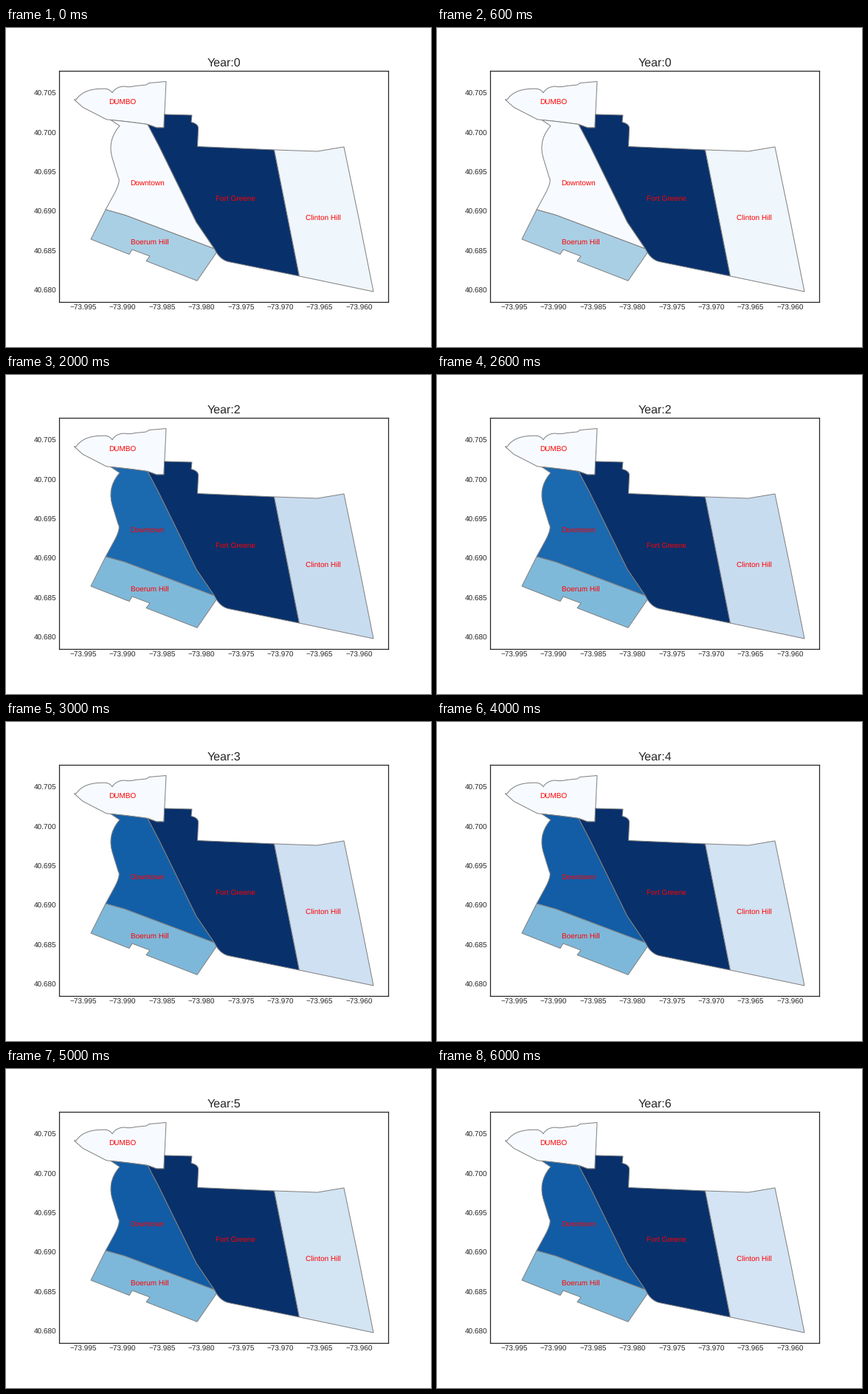
These frames come from a looping animation (576x432 px, 7000 ms). A matplotlib script:

```python
import numpy as np
import matplotlib.pyplot as plt
from matplotlib.animation import FuncAnimation
from matplotlib.patches import Polygon

plt.rcParams["font.family"] = "Liberation Sans"
plt.rcParams["text.hinting"] = "none"

W, H = 576, 432
LEFT, RIGHT, TOP, BOTTOM = 72, 518.4, 58.3, 371.3
STEP = 53.4  # pixels per 0.005 degrees
YEARS = 7
INK = "0.15"


def curve(a, bend, b):
    """Points of a quadratic curve from a to b, pulled towards bend."""
    t = np.linspace(0, 1, 9)[:, None]
    a, bend, b = map(np.array, (a, bend, b))
    return [*((1 - t) ** 2 * a + 2 * t * (1 - t) * bend + t ** 2 * b)]


# Borders shared by neighbours, in stage pixels (y grows downwards).
corner = (282.5, 299)
north = curve((142, 124.5), (168, 127), (192, 130.5))
quay = [(192, 130.5), (204, 135), (214, 135)]
middle = [(192, 130.5), (207, 159), (258, 263), corner]
south = [(135, 246), (161, 253.3), corner]
east = [(363.5, 165), (397.5, 336)]

dumbo = [
    *north, *quay, (217, 72.5), (194, 74.5), (190, 77),
    *curve((175, 78.5), (167, 80.5), (160, 79)),
    *curve((160, 79), (149, 79.5), (144, 87.8)),
    *curve((144, 87.8), (140, 81.5), (131, 82.3)),
    *curve((131, 82.3), (105, 82), (95, 97)),
    (92.3, 96.8), (104, 107.3), (136, 123.8)]

downtown = [
    *north, *middle, *south[::-1],
    *curve((147, 224), (156, 207), (152, 202)),
    *curve((144, 176), (137, 152), (154, 132.5))]

boerum = [
    *south, (286, 303), (259, 342.3), (190, 315.5), (195, 309),
    (171, 300), (167, 306.5), (115, 286)]

greene = [
    *quay, (214.5, 117), (252, 118),
    *curve((251, 127.5), (262, 130), (260.5, 138)), (259.5, 160.5),
    *east, *curve((304, 317), (290, 315), corner), *middle[::-1]]

clinton = [*east[::-1], (422, 167), (458, 161), (479, 262), (498, 357)]

# name, outline, label centre and baseline, share of the scale by year
AREAS = [
    ("DUMBO", dumbo, (158, 104.3), lambda y: 0.0),
    ("Downtown", downtown, (192, 212.7), lambda y: 0.83 * (1 - 0.25 ** y)),
    ("Boerum Hill", boerum, (195, 292.7),
     lambda y: 0.456 - 0.116 * 0.22 ** y),
    ("Fort Greene", greene, (311, 234.5), lambda y: 1.0),
    ("Clinton Hill", clinton, (430, 259.5),
     lambda y: 0.17 + 0.229 * 0.55 ** y - 0.359 * 0.05 ** y),
]

fig = plt.figure(figsize=(W / 72, H / 72), dpi=72, facecolor="white")
ax = fig.add_axes([LEFT / W, 1 - BOTTOM / H,
                   (RIGHT - LEFT) / W, (BOTTOM - TOP) / H])
ax.set_xlim(LEFT, RIGHT)
ax.set_ylim(BOTTOM, TOP)
ax.set_xticks([104.8 + STEP * i for i in range(8)],
              [f"\u2212{73.995 - 0.005 * i:.3f}" for i in range(8)])
ax.set_yticks([88.4 + STEP * i for i in range(6)],
              [f"{40.705 - 0.005 * i:.3f}" for i in range(6)])
ax.tick_params(length=0, pad=3.5, labelsize=10, labelcolor=INK)
for spine in ax.spines.values():
    spine.set(color=INK, linewidth=1.25)

title = ax.set_title("", fontsize=16, color=INK, pad=6)
blues = plt.get_cmap("Blues")
patches = []
for name, outline, spot, _ in AREAS:
    patch = Polygon(outline, closed=True, edgecolor="gray", linewidth=1)
    patches.append(ax.add_patch(patch))
    ax.text(*spot, name, color="red", fontsize=10, ha="center",
            va="baseline", zorder=3)


def draw(year):
    title.set_text(f"Year:{year}")
    for patch, (*_, share) in zip(patches, AREAS):
        patch.set_facecolor(blues(share(year)))
    return [title, *patches]


anim = FuncAnimation(fig, draw, frames=YEARS, interval=1000,
                     repeat=True, repeat_delay=0)
plt.show()
```
